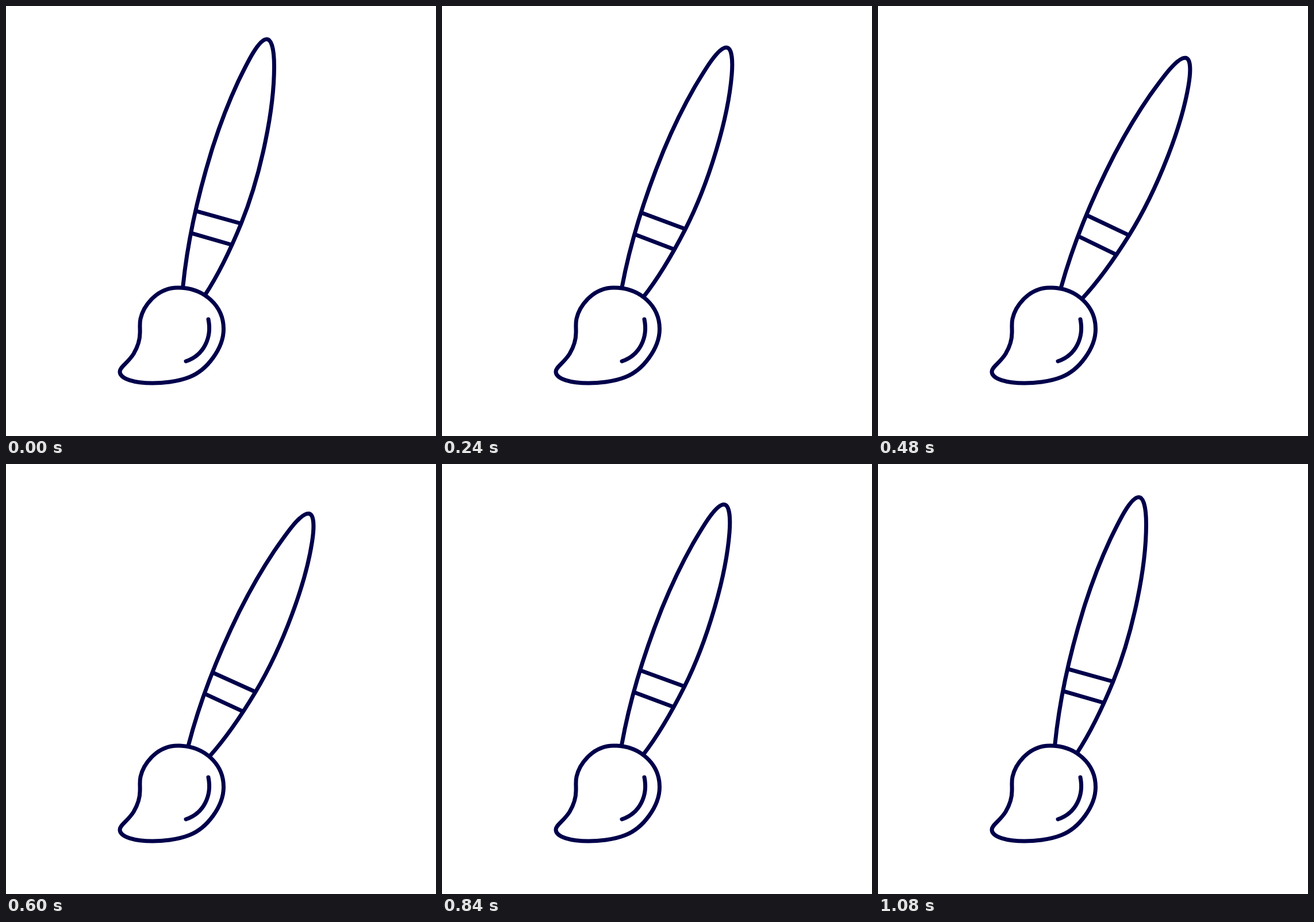
Recreate the animation shown at these times as an HTML page. Size 748 by 748 pixels, loop 2.85 s.

```html
<!DOCTYPE html>
<html lang="en">
<head>
<meta charset="utf-8">
<title>Paintbrush</title>
<style>
  html, body { margin: 0; width: 100%; height: 100%; overflow: hidden; background: #fff; }
  svg { display: block; width: 100%; height: 100%; }
</style>
</head>
<body>
<svg viewBox="0 0 748 748" fill="none" stroke="#00004b" stroke-width="7" stroke-linejoin="round">
  <g id="handle">
    <path d="M306 508 L307.8 488 C316 407 334.5 326 359.8 245 C372 207 386.3 169 404 131
             C420 98 439.5 57.7 453.6 57.7 C462.5 57.7 466.5 78 466.5 105 C466.5 148 460.2 192 451.3 235
             C441.5 283 428.3 331 409 378.5 C392 420 373 462 346 503 L335 519"/>
    <path d="M329.5 356.3 L409 378.5 M321.5 394.9 L393 415.5"/>
  </g>
  <path fill="#fff" d="M299 490 C345 490 378.5 522 378.5 562 C378.5 595 350 633.5 319 645.5
    C298 654 270 656 255 656 C224 656 198 649 198 636 C198 628 212 621 222 605
    C229 593 233 580 233 569 C233.5 560 232 553 234 544 C239 522 262 490 299 490 Z"/>
  <path stroke-linecap="round" d="M352 545 C358.5 577 344 607.5 313 618"/>
</svg>
<script>
  const LOOP = 2850, STEP = 30, PEAK = 510, REST = 1080;
  const MAX_ANGLE = 10.4;
  const handle = document.getElementById('handle');
  const start = performance.now();

  // Linear swing out and slightly slower return, then a pause.
  function angleAt(time) {
    if (time <= PEAK) return MAX_ANGLE * time / PEAK;
    return MAX_ANGLE * Math.max(0, (REST - time) / (REST - PEAK));
  }

  function draw() {
    const time = Math.max(0, performance.now() - start) % LOOP;
    const stepped = Math.floor(time / STEP) * STEP;
    handle.setAttribute('transform', `rotate(${angleAt(stepped)} 304 551)`);
    requestAnimationFrame(draw);
  }
  draw();
</script>
</body>
</html>
```
